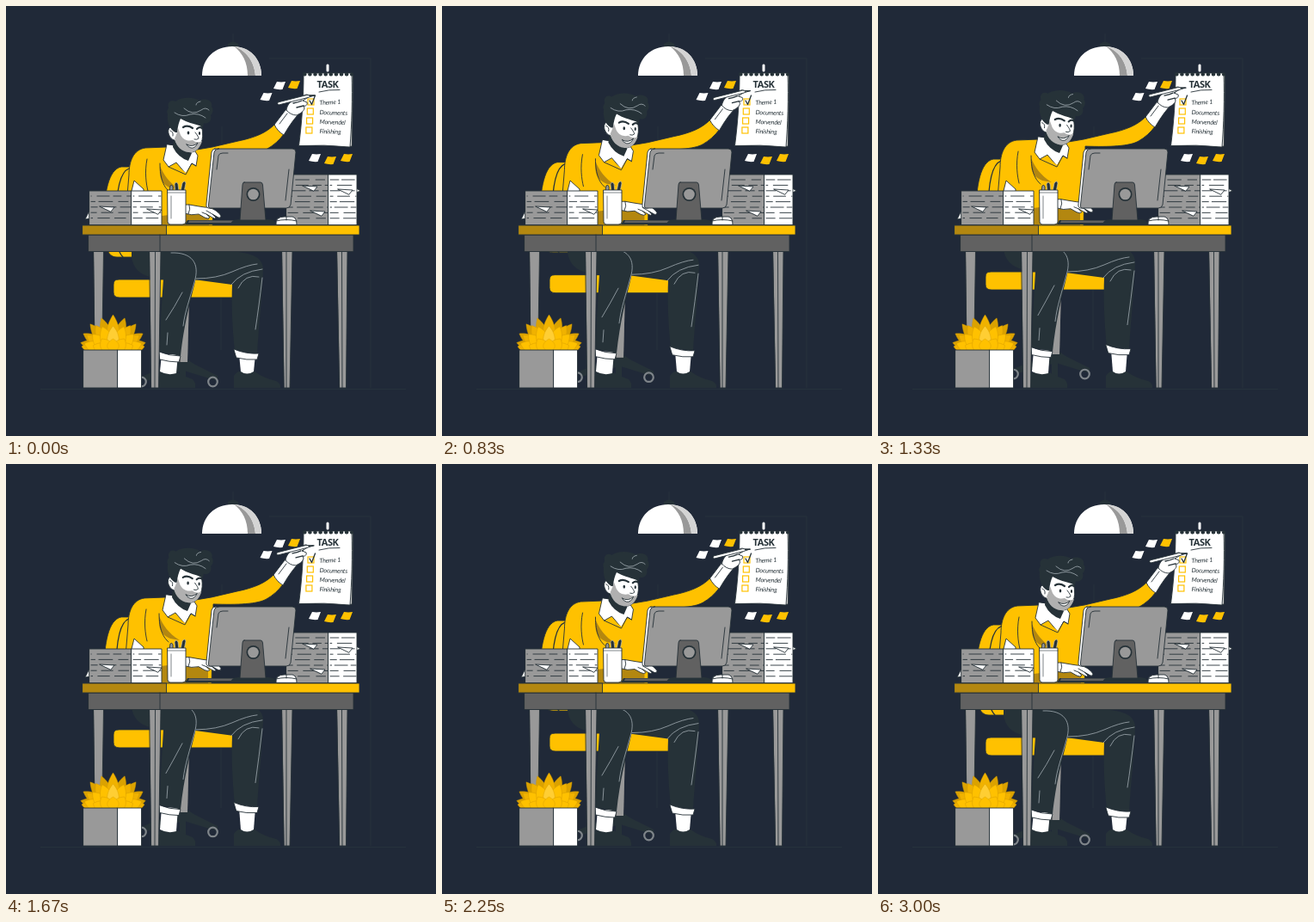
Recreate the animation shown at these times as an HTML page. Size 500 px wide and 500 px high, loop 3040 ms.

```html
<!DOCTYPE html>
<html lang="en">
<head>
<meta charset="utf-8">
<title>Desk work</title>
<style>
  html, body { margin: 0; width: 100%; height: 100%; overflow: hidden; background: #202938; }
  svg { display: block; width: 100%; height: 100%; }
  .ink { stroke: #263238; stroke-width: .9; stroke-linejoin: round; stroke-linecap: round; }
  .line { fill: none; stroke: #263238; stroke-width: .9; stroke-linecap: round; stroke-linejoin: round; }
  .faint { fill: none; stroke: #26323c; stroke-width: 1; }
  .pale { fill: none; stroke: #a3adb3; stroke-width: .8; stroke-linecap: round; }
  .y { fill: #ffc100; } .o { fill: #b38710; } .w { fill: #fff; }
  .g { fill: #999; } .d { fill: #616161; } .k { fill: #263238; }
  .title { font: bold 11px "Open Sans", "Noto Sans", sans-serif; font-stretch: 75%; letter-spacing: -.4px; }
  .note { font: italic 7.2px Lato, sans-serif; letter-spacing: -.2px; }
</style>
</head>
<body>
<svg viewBox="0 0 500 500">
  <path class="faint" d="M306 61H424V444M40 445.500H465M251 140V160M250 290V400"/>

  <!-- lamp -->
  <path class="faint" d="M264 32V42"/>
  <path class="k" d="M258 48V44Q264 39 270 44V48Z"/>
  <path class="w" d="M228 81C228 61 243 47 263 47S297 61 297 81Z"/>
  <path class="g" d="M265 47C279 51 289 65 290 81H281C281 66 275 54 265 47Z"/>
  <path d="M265 47C279 51 289 65 290 81H297C297 61 283 47 265 47Z" fill="#d4d4d4"/>

  <g id="notes"></g>

  <!-- task sheet -->
  <path d="M350 79H403.500L402.500 163 395 164Z" fill="#c9c9c9" class="ink"/>
  <path class="w ink" d="M346 78H402C403 108 402 138 400 164Q370 161 340.500 162.500C344 135 346 108 346 78Z"/>
  <path class="line" d="M347 79.500H402" style="stroke-width:4;stroke-dasharray:.6 5.500"/>
  <rect class="w" x="372.500" y="67.500" width="3" height="9" rx="1.500"/>
  <text class="title k" x="374" y="95" text-anchor="middle">TASK</text>
  <path class="line" d="M364 100Q375 97 388 97.500"/>
  <g id="list"></g>
  <path class="line" d="M353 110L355.500 114.500 359.500 104" style="stroke-width:1.300"/>

  <g id="chair">
    <g class="k">
      <path d="M198 412H212L220 417 246 430V436L207 424 163 436 157 431 190 418Z"/>
      <path d="M202 418H209V440H202Z"/>
    </g>
    <g fill="none" stroke="#7f858a" stroke-width="2.200">
      <circle cx="157.500" cy="437" r="5.300"/><circle cx="240.500" cy="437" r="5.300"/>
    </g>
    <path class="d" d="M196 336H213L211 414H199Z"/>
    <path class="g" d="M203 336H213L211 414H203Z"/>
    <path class="y ink" d="M152 187H134C119 190 114 218 114 250C114 278 117 292 129 292H152Z"/>
    <path class="line" d="M143 189C132 193 128 218 128 250C128 276 130 286 136 292" style="stroke-width:1.300"/>
    <path class="y ink" d="M130 318H255Q264 319 264 326V339H132Q125 339 125 333V324Q125 318 130 318Z"/>
  </g>

  <!-- shoes -->
  <g class="k">
    <path d="M265 444V430Q270 422 278 426L289 425Q300 433 314 436Q320 439 319 444Z"/>
    <path d="M176 444V431Q180 422 190 427L199 426Q208 431 217 434Q221 438 220 444Z"/>
  </g>
  <path data-leg="ankleR" class="w"/>
  <path data-leg="ankleL" class="w"/>
  <path data-leg="pantR" class="k"/>
  <path data-leg="cuffR" class="w ink"/>
  <path data-leg="pantL" class="k"/>
  <path data-leg="cuffL" class="w ink"/>
  <path data-leg="folds" class="pale"/>

  <!-- torso, arm, head -->
  <g id="body">
    <path class="y ink" d="M187 164L162 165C148 167 143 181 143 196L137 268H240L242 172C270 173 294 172 304 166C311 162 318 156 323 149L312 138C303 147 290 153 270 157L240 164 222 167Z"/>
    <path class="o" d="M179 186C178 201 181 207 192 212L203 214C189 205 184 197 179 186ZM181 244Q211 239 236 244V268H181Z"/>
    <path class="line" d="M164 178C161 193 163 207 165 215M179 183C179 202 184 211 190 216"/>
    <path class="w ink" d="M187 161L183 179 189 187 198 182 209 195 216 183 221 186 223 174 218 166Z"/>
    <path class="y" d="M190 188L197 184 209 194 215 185 220 187 212 206Z"/>
    <path class="line" d="M189 187L209 196 216 183 221 186"/>
    <path class="k" d="M195 156L194 164Q200 176 212 180L216 171Z"/>
    <g id="head">
      <path class="w ink" d="M199 123L225 132 228 142C229 149 229 154 227 159C224 167 219 171 212 170C205 169 199 164 196 156C190 155 186 144 191 141C194 140 196 142 198 145Z"/>
      <path d="M196 154C198 150 199 147 200 142L203 150C207 157 213 157 217 156Q222 160 228 157C225 167 219 171 212 170C205 169 198 164 196 154Z" fill="#b0b0b0"/>
      <path class="k" d="M197 147C189 143 187 132 188 126C186 121 189 120 189 118C187 112 192 108 197 111C205 105 219 106 225 110C233 106 241 111 239 117C242 121 240 125 238 127C240 134 234 138 230 136L229 141C224 138 216 137 209 134L203 131Q200 137 199 147Z"/>
      <path class="pale" d="M196 124Q205 130 214 126Q224 124 232 130M207 119Q217 128 227 121Q232 117 236 121M226 111Q221 112 221 115"/>
      <path class="line" d="M206 141Q211 138 217 142M222 143Q225 140 228 142" style="stroke-width:2.200"/>
      <path class="line" d="M220 147Q224 152 224 154Q222 156 219 155M191 145Q195 146 194 151"/>
      <path class="w line" d="M210 161Q217 165 223 159Q220 166 215 165 211 164 210 161Z" style="fill:#fff"/>
      <ellipse class="k" cx="212" cy="147.500" rx="1.300" ry="2"/>
      <ellipse class="k" cx="225" cy="148" rx="1.100" ry="2"/>
    </g>
    <path class="w ink" d="M312 138L328 117Q333 113 338 115L343 123Q334 131 323 150Q316 146 312 138Z"/>
    <path class="line" d="M318 137L327 125"/>
    <path class="w ink" d="M326 121C327 114 332 109 339 107L349 103C353 103 353 106 350 107L345 110L350 112C351 115 348 117 346 116L347 119C346 123 342 125 338 127Q331 127 326 121Z"/>
    <path class="w ink" d="M316 112L350 103.500 358.500 104 351 106.500 317 115Q315 114 316 112Z"/>
    <path class="line" d="M353 104.500L359 104M334 113Q340 112 344 110M338 118L346 116" style="stroke-width:1.300"/>
  </g>

  <!-- desk -->
  <g class="ink">
    <path class="g" d="M102 285H113.500L111 444H104Z"/>
    <path class="g" d="M167 285H180L177.500 444H169Z"/>
    <path class="g" d="M321 285H333L330 444H323.500Z"/>
    <path class="g" d="M385 285H397L395.500 444H388Z"/>
    <path class="d" d="M96 266H404V285.500H96Z"/>
    <path class="y" d="M89 255H411V266H89Z"/>
    <path class="o" d="M89 255H186.500V266H89Z"/>
  </g>
  <path class="line" d="M179 266V285M173.500 286L173 444M326 286V444M390.500 286L391 444"/>

  <!-- keyboard and hand -->
  <path class="k" d="M208 254L211 249H270V254Z"/>
  <path class="d" d="M213 249.500H269V252H212Z"/>
  <g id="hand">
    <path class="w ink" d="M207 231H213Q224 233 231 234C239 234 246 238 250 244Q250 247 247 246L240 242 244 246Q243 248 240 246L233 242 237 246Q235 248 231 246L224 242Q216 244 207 241Z"/>
    <path class="line" d="M233 238L240 242M228 240L233 242M213 231Q215 236 212 242"/>
  </g>

  <!-- paper piles -->
  <path class="w ink" d="M146 215L149 203 160 213V217ZM97 238L92 248 98 247ZM406 211L412 215 407 217Z"/>
  <g id="piles"></g>

  <!-- monitor -->
  <path class="w ink" d="M243 166H248L240 235H235Q232 234 233 230L239 170Q240 166 243 166Z"/>
  <path class="g ink" d="M247 166H333Q337 166 337 170L331 231Q330 235 326 235H237Q235 235 235.500 231L242 170Q243 166 247 166Z"/>
  <path class="line" d="M245 190L247 174Q248 171 252 171H258M325 226L329 190"/>
  <path class="k" d="M261 254Q262 248 270 248H305Q313 248 314 254Z"/>
  <path class="d ink" d="M277 205H296Q298 205 298.500 208L302 249H272L275 208Q275 205 277 205Z"/>
  <circle class="k" cx="287.500" cy="219" r="8"/>
  <circle class="g" cx="287.500" cy="219" r="6.300"/>
  <path class="w ink" d="M314 254Q313 245 324 245H333Q338 246 338 254Z"/>
  <path class="line" d="M314 250Q326 247 338 250M326 245V249"/>

  <!-- pen holder -->
  <g class="ink">
    <path class="g" d="M190 216L191 209Q193 207 194 210V216Z"/>
    <path class="k" d="M197 216L196 207Q198 203 200 207L201 216ZM203 216L205 206Q208 202 209 206L207 216Z" style="stroke:#c8c8c8;stroke-width:.6"/>
    <path class="w" d="M188 214H209V251Q209 254 205 254H191Q188 254 188 251Z"/>
  </g>
  <path class="line" d="M192 221V247M188 217H209" opacity=".65"/>

  <!-- plant -->
  <g id="plant"></g>
  <path class="g ink" d="M90 400H130V444H90Z"/>
  <path class="w ink" d="M130 400H157.500V444H130Z"/>
</svg>
<script>
const LOOP = 3040, LIFT = 9.3;
const $ = id => document.getElementById(id);

function add(parent, tag, attrs, text) {
  const el = document.createElementNS("http://www.w3.org/2000/svg", tag);
  for (const k in attrs) el.setAttribute(k, attrs[k]);
  if (text) el.textContent = text;
  return parent.appendChild(el);
}

// sticky notes
[[311, 88, "w"], [295.5, 101, "w"], [328, 87, "y"], [352, 172, "w"], [370, 175, "y"], [389, 172, "y"]]
  .forEach(([x, y, c]) => add($("notes"), "path", { class: c, d: `M${x + 4} ${y}Q${x + 9} ${y + .8} ${x + 14} ${y}L${x + 10.5} ${y + 9}Q${x + 5} ${y + 9.5} ${x} ${y + 8}Z` }));

// task list
["Theme 1", "Documents", "Morvendel", "Finishing"].forEach((t, i) => {
  const y = 108 + i * 11;
  add($("list"), "rect", { x: 351 - i * .7, y, width: 7, height: 7, fill: "none", stroke: "#ffc100", "stroke-width": 1.2 });
  add($("list"), "text", { class: "note k", x: 364.5, y: y + 7, transform: `rotate(${i ? 2 : -3} 365 ${y + 7})` }, t);
});

// piles of paper
let seed = 7;
const rnd = () => (seed = seed * 16807 % 2147483647) / 2147483647;
function pile(x, w, top, cls) {
  const g = $("piles");
  add(g, "path", { class: cls + " ink", d: `M${x} ${top}H${x + w}V254.500H${x}Z` });
  for (let y = top + 6; y < 252; y += 6.4) {
    const dash = [9, 3, 13, 4].map(n => (n + rnd() * 4).toFixed(1));
    add(g, "path", { class: "line", d: `M${x + 2} ${y}H${x + w - 1}`, "stroke-dasharray": dash, "stroke-dashoffset": rnd() * 12 });
  }
}
function tab(x, y) {
  add($("piles"), "path", { class: "w ink", d: `M${x} ${y}L${x + 17} ${y + 1} ${x + 13} ${y + 6}Z` });
}
pile(97, 49, 215, "g");
pile(146, 35, 215, "w");
pile(326, 49, 196, "g");
pile(375, 33, 196, "w");
[[109, 233], [164, 236], [345, 209], [386, 213], [354, 238]].forEach(p => tab(...p));

// lotus leaves
function petals(fill, width, y, list) {
  for (const [angle, len] of list) for (const s of angle ? [-1, 1] : [1])
    add($("plant"), "path", {
      fill, stroke: "#d19a00", "stroke-width": .4,
      transform: `translate(${124.5 + s * angle * .1} ${y}) rotate(${s * angle})`,
      d: `M0 0C${-width} ${-len * .2} ${-width} ${-len * .65} 0 ${-len}C${width} ${-len * .65} ${width} ${-len * .2} 0 0Z`
    });
}
petals("#dba200", 9, 399, [[76, 31], [58, 34], [38, 37], [18, 38]]);
petals("#f0b200", 10, 401, [[80, 29], [54, 31], [30, 34], [0, 42]]);
petals("#ffc100", 10, 402, [[70, 28], [44, 28], [20, 31]]);
petals("#ffce33", 9, 401, [[0, 29]]);
petals("#ffc100", 9, 402, [[66, 18], [34, 18], [0, 15]]);

// leg outlines for a hip raised by h
function legShapes(h) {
  const a = h * .9, c = h * .6;
  return {
    ankleR: `M271 ${405 + c}L273 425Q280 430 288 425L290 ${405 + c}Z`,
    ankleL: `M181 ${405 + c}L179 425Q188 430 198 427L200 ${405 + c}Z`,
    pantR: `M190 ${280 + a}L270 ${286 + a}Q299 ${289 + a} 299 ${306 + a}C298 ${335 + a} 294 ${372 + c} 292 ${404 + c}L266 ${401 + c}C263 ${375 + c} 262 ${345 + a} 263 ${324 + a}L218 ${318 + a}Z`,
    pantL: `M146 ${280 + h}V${292 + h}Q149 ${311 + h} 168 ${315 + h}L183 ${318 + h}C181 345 179 ${375 + c} 179 ${402 + c}L203 ${407 + c}C207 ${370 + c} 214 ${345 + a} 220 ${320 + a}C225 ${302 + a} 220 ${289 + a} 203 ${287 + a}L180 ${280 + a}Z`,
    cuffR: `M265 ${399 + c}Q279 ${405 + c} 294 ${404 + c}L292 ${411 + c}Q280 ${412 + c} 268 ${409 + c}Z`,
    cuffL: `M178 ${402 + c}Q190 ${407 + c} 203 ${407 + c}L201 ${414 + c}Q190 ${414 + c} 179 ${411 + c}Z`,
    folds: `M192 ${287 + a}C216 ${286 + a} 226 ${299 + a} 219 ${321 + a}C214 ${340 + a} 208 ${355 + c} 206 ${372 + c}` +
      `M221 ${317 + a}Q245 ${317 + a} 263 ${309 + a}T292 ${300 + a}M262 ${324 + a}Q273 ${309 + a} 298 ${306 + a}` +
      `M270 ${328 + a}Q278 ${311 + a} 294 ${315 + a}M298 ${316 + a}Q294 ${350 + a} 290 ${376 + c}` +
      `M186 ${365 + c}Q196 ${350 + a} 205 ${333 + a}M187 ${394 + c}L188 ${380 + c}`
  };
}

const legs = [...document.querySelectorAll("[data-leg]")];
const move = (id, x, y) => $(id).setAttribute("transform", `translate(${x} ${y})`);

function draw(now) {
  const up = (1 - Math.cos(now % LOOP / LOOP * 2 * Math.PI)) / 2;
  const h = -LIFT * up;
  move("body", -up, h);
  $("head").setAttribute("transform", `rotate(${up * 1.5} 207 170)`);
  move("chair", 0, h);
  move("hand", 0, h * .7);
  const shapes = legShapes(h);
  for (const el of legs) el.setAttribute("d", shapes[el.dataset.leg]);
}

const start = performance.now();
function tick() {
  draw(performance.now() - start);
  requestAnimationFrame(tick);
}
tick();
</script>
</body>
</html>
```
